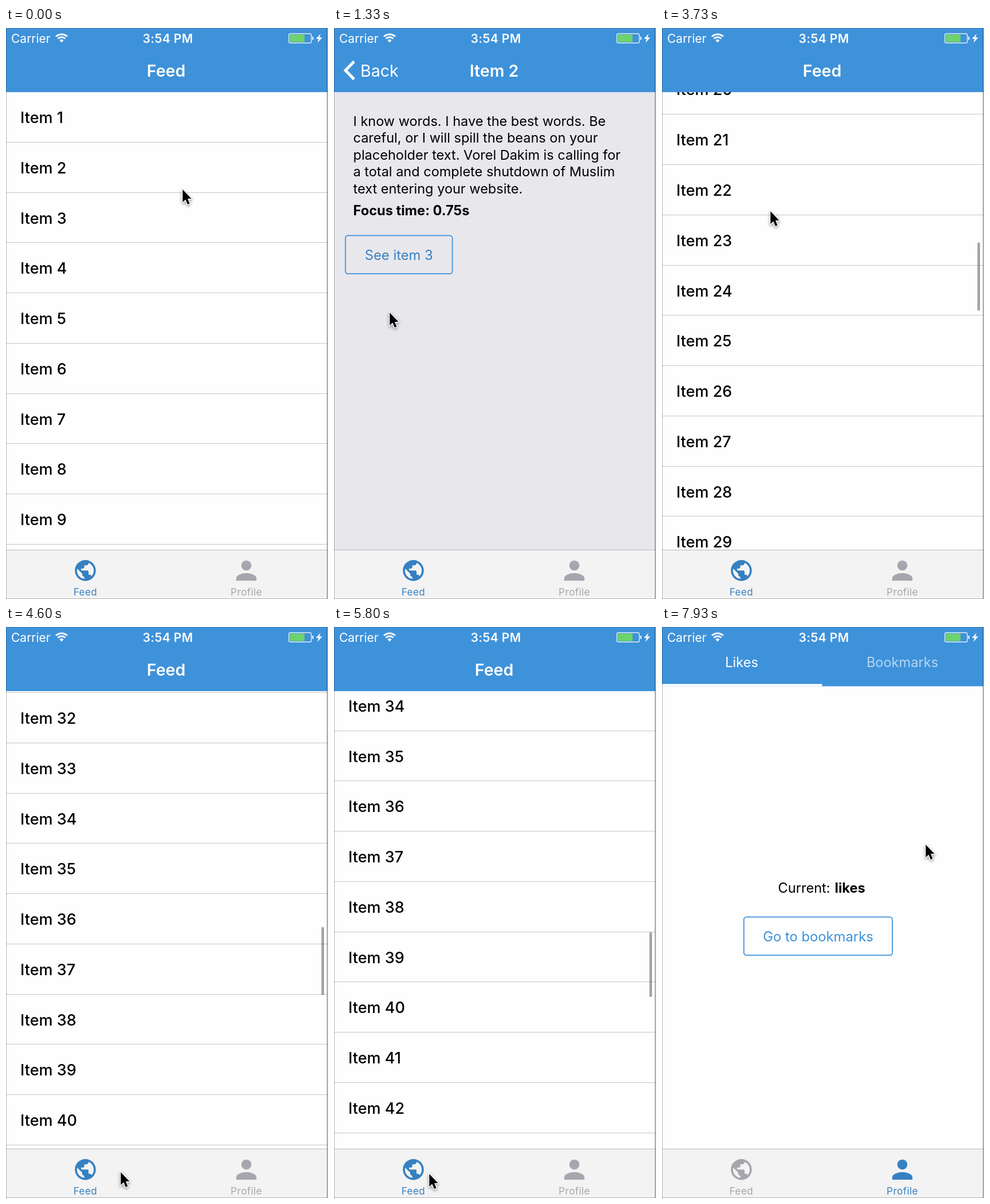
An HTML page with a canvas that plays this animation: 562 by 997 pixels, repeating every 8000 ms.

```html
<!DOCTYPE html>
<html lang="en">
<head>
<meta charset="utf-8">
<title>Feed navigation</title>
<style>
html, body { margin: 0; width: 100%; height: 100%; overflow: hidden; background: #fff; }
canvas { display: block; width: 562px; height: 997px; }
</style>
</head>
<body>
<canvas id="stage"></canvas>
<script>
const W = 562, H = 997, LOOP = 8000;
const TOP = 112, BOTTOM = 911, VIEW = BOTTOM - TOP, ROW = 87.78;
const BLUE = '#3e92da', LINK = '#3681c2', GREY = '#a5a6ae';

const PUSH = 400, FOCUS = 580, POP = 2502, SLIDE = 500;
const DRAG1 = 2850, FLING1 = 3040, DRAG2 = 3550, FLING2 = 3730;
const TO_TOP = 6000, AT_TOP = 6350, PROFILE = 7450, DECAY = 504;

const canvas = document.getElementById('stage');
const ratio = window.devicePixelRatio || 1;
canvas.width = W * ratio;
canvas.height = H * ratio;
const ctx = canvas.getContext('2d');

const clamp = v => Math.min(1, Math.max(0, v));
const smooth = u => u * u * (3 - 2 * u);
const span = (t, a, b) => clamp((t - a) / (b - a));

// Cubic bezier (0.2833, 0.99, 0.31833, 0.99), solved by bisection
function slideEase(u) {
  let lo = 0, hi = 1;
  for (let i = 0; i < 24; i++) {
    const s = (lo + hi) / 2, r = 1 - s;
    const x = 3 * r * r * s * 0.2833 + 3 * r * s * s * 0.31833 + s * s * s;
    if (x < u) lo = s; else hi = s;
  }
  const s = (lo + hi) / 2;
  return 2.97 * s * (1 - s) + s * s * s;
}

// time, x, y, 1 = constant speed
const pointer = [
  [0, 308, 280], [480, 308, 280], [1100, 97, 495], [1750, 97, 495],
  [2350, 66, 97], [2620, 66, 97], [2800, 185, 800], [DRAG1, 185, 800],
  [FLING1, 190, 320, 1], [3150, 190, 320], [3400, 185, 815], [DRAG2, 185, 815],
  [FLING2, 189, 318, 1], [3950, 189, 318], [4500, 200, 950], [4900, 200, 950],
  [5400, 166, 953], [7000, 166, 953], [7350, 422, 963], [7800, 422, 963],
  [7930, 460, 378, 1], [LOOP, 460, 378]
];

function pointerAt(t) {
  const i = pointer.findIndex(k => k[0] > t);
  const a = pointer[i - 1], b = pointer[i];
  let u = span(t, a[0], b[0]);
  if (!b[3]) u = smooth(u);
  return [a[1] + (b[1] - a[1]) * u, a[2] + (b[2] - a[2]) * u];
}

const coast = (t, start, reach) => reach * (1 - Math.exp(-(t - start) / DECAY));

function scrollAt(t) {
  if (t < DRAG1 || t >= AT_TOP) return 0;
  if (t < FLING1) return 480 * span(t, DRAG1, FLING1);
  if (t < DRAG2) return 480 + coast(t, FLING1, 1160);
  if (t < FLING2) return 1218 + 496 * span(t, DRAG2, FLING2);
  const rest = 1714 + coast(Math.min(t, TO_TOP), FLING2, 1221);
  return rest * (1 - smooth(span(t, TO_TOP, AT_TOP)));
}

function cardAt(t) {
  if (t < POP) return slideEase(span(t, PUSH, PUSH + SLIDE));
  return 1 - slideEase(span(t, POP, POP + SLIDE));
}

function rect(x, y, w, h, color) {
  ctx.fillStyle = color;
  ctx.fillRect(x, y, w, h);
}

function pill(x, y, w, h, r) {
  ctx.beginPath();
  ctx.roundRect(x, y, w, h, r);
}

function text(str, x, y, size, { weight = 400, color = '#000', align = 'left', gap = 0, alpha = 1 } = {}) {
  if (alpha <= 0) return;
  ctx.save();
  ctx.globalAlpha *= alpha;
  ctx.font = `${weight} ${size}px Inter, Roboto, sans-serif`;
  ctx.letterSpacing = gap + 'px';
  ctx.textAlign = align;
  ctx.fillStyle = color;
  ctx.fillText(str, x, y);
  ctx.restore();
}

function button(label, x, y, w, h, color) {
  ctx.strokeStyle = BLUE;
  ctx.lineWidth = 1.75;
  pill(x + 0.9, y + 0.9, w - 1.8, h - 1.8, 4.5);
  ctx.stroke();
  text(label, x + w / 2, y + 43, 23.8, { color, align: 'center' });
}

function drawList(scroll, p) {
  ctx.save();
  ctx.globalAlpha = 1 - 0.7 * p;
  const first = Math.max(0, Math.floor(scroll / ROW) - 1);
  for (let n = first; n < first + 12; n++) {
    const y = TOP + n * ROW - scroll;
    text('Item ' + (n + 1), 25 - 17.5 * p, Math.round(y + 54), 27, { weight: 500 });
    rect(0, Math.round(y + ROW) - 1, W, 1, '#c6c6c9');
  }
  ctx.restore();
}

function drawThumb(t, scroll) {
  const alpha = span(t, DRAG1, DRAG1 + 60) * (1 - span(t, 6400, 6600));
  if (!alpha) return;
  const content = t < 5200 ? 5365 : 5630;
  ctx.save();
  ctx.globalAlpha = alpha;
  ctx.fillStyle = 'rgba(0,0,0,.36)';
  pill(550.5, 119 + VIEW * scroll / content, 4.5, VIEW * VIEW / content, 2.2);
  ctx.fill();
  ctx.restore();
}

const story = [
  'I know words. I have the best words. Be',
  'careful, or I will spill the beans on your',
  'placeholder text. Vorel Dakim is calling for',
  'a total and complete shutdown of Muslim',
  'text entering your website.'
];

function drawCard(t, p) {
  if (p <= 0) return;
  ctx.save();
  ctx.translate(616 * (1 - p), 0);
  ctx.save();
  ctx.shadowColor = 'rgba(0,0,0,.5)';
  ctx.shadowBlur = 34 * ratio;
  rect(p < 1 ? -1 : 0, TOP, W + 1, VIEW - 8, '#e8e7ec');
  ctx.restore();
  rect(-1, TOP, W + 1, VIEW, '#e8e7ec');
  story.forEach((line, i) => text(line, 33.5, Math.round(171 + 29.4 * i), 23.5));
  const focus = Math.max(0, Math.min(t, POP) - FOCUS) / 1000;
  text(`Focus time: ${focus.toFixed(2)}s`, 33.5, 327, 23.6, { weight: 700 });
  button('See item 3', 19, 361.5, 188.5, 68.5, LINK);
  ctx.restore();
}

function drawFeed(t) {
  const p = cardAt(t), scroll = scrollAt(t);
  ctx.save();
  ctx.beginPath();
  ctx.rect(0, TOP, W, VIEW);
  ctx.clip();
  drawList(scroll, p);
  drawThumb(t, scroll);
  drawCard(t, p);
  ctx.restore();

  rect(0, 0, W, TOP, BLUE);
  const title = { weight: 600, color: '#fff', align: 'center' };
  text('Feed', 279.5 - 350 * p, 85, 28.5, { ...title, alpha: 1 - p });
  text('Item 2', 279.5 + 350 * (1 - p), 85, 28.5, { ...title, alpha: p });
  const back = clamp(2 * p - 1);
  if (back > 0) {
    ctx.save();
    ctx.globalAlpha = back;
    ctx.strokeStyle = '#fff';
    ctx.lineWidth = 5;
    ctx.beginPath();
    ctx.moveTo(35, 58.5);
    ctx.lineTo(20, 74);
    ctx.lineTo(35, 89.5);
    ctx.stroke();
    text('Back', 46, 85, 28.5, { color: '#fff' });
    ctx.restore();
  }
}

function drawProfile() {
  rect(0, 0, W, 103.5, BLUE);
  rect(0, 99.5, 279.5, 4, '#fff');
  text('Likes', 139, 70, 23.6, { color: '#fff', align: 'center' });
  text('Bookmarks', 419.5, 70, 23.6, { color: '#fff', align: 'center', alpha: 0.62 });
  text('Current:', 202.5, 464, 23.6);
  text('likes', 301.5, 464, 23.6, { weight: 700 });
  button('Go to bookmarks', 142, 505.5, 261, 68.5, BLUE);
}

function drawStatus() {
  text('Carrier', 9, 25.5, 21, { color: '#fff' });
  text('3:54 PM', 282.5, 25.5, 21, { weight: 600, color: '#fff', align: 'center', gap: 0.4 });

  ctx.strokeStyle = ctx.fillStyle = '#fff';
  ctx.lineWidth = 2.8;
  const a = Math.PI * 0.25;
  for (const r of [9, 14]) {
    ctx.beginPath();
    ctx.arc(97, 25, r, -Math.PI + a, -a);
    ctx.stroke();
  }
  ctx.beginPath();
  ctx.moveTo(97, 25.5);
  ctx.arc(97, 25, 5, -Math.PI + a, -a);
  ctx.fill();

  ctx.lineWidth = 1.2;
  pill(493.8, 9.8, 39, 16.4, 2.5);
  ctx.stroke();
  rect(495.5, 11.5, 25.5, 13, '#6fd36c');
  pill(534.5, 15, 2, 6, 1);
  ctx.fillStyle = '#fff';
  ctx.fill();
  ctx.fill(new Path2D('M549 10L541 19H545.5L543.5 26L552 16.5H547Z'));
}

const globe = new Path2D('M12 2C6.48 2 2 6.48 2 12s4.48 10 10 10 10-4.48 10-10S17.52 2 12 2zm-1 17.93c-3.95-.49-7-3.85-7-7.93 0-.62.08-1.21.21-1.79L9 15v1c0 1.1.9 2 2 2v1.93zm6.9-2.54c-.26-.81-1-1.39-1.9-1.39h-1v-3c0-.55-.45-1-1-1H8v-2h2c.55 0 1-.45 1-1V7h2c1.1 0 2-.9 2-2v-.41c2.93 1.19 5 4.06 5 7.41 0 2.08-.8 3.97-2.1 5.39z');
const person = new Path2D('M12 14C9.33 14 4 15.34 4 18V20H20V18C20 15.34 14.67 14 12 14Z');
person.moveTo(16, 8);
person.arc(12, 8, 4, 0, Math.PI * 2);

function tab(icon, label, x, y, scale, color) {
  ctx.save();
  ctx.translate(x - 12 * scale, y - 12 * scale);
  ctx.scale(scale, scale);
  ctx.fillStyle = color;
  ctx.fill(icon);
  ctx.restore();
  text(label, x, 991, 17, { color, align: 'center', gap: 0.45 });
}

function drawTabs(onProfile) {
  rect(0, BOTTOM, W, H - BOTTOM, '#f3f3f3');
  rect(0, BOTTOM, W, 1, '#b9b9b9');
  tab(globe, 'Feed', 138.5, 947.3, 1.83, onProfile ? GREY : LINK);
  tab(person, 'Profile', 419.5, 947.3, 2.2, onProfile ? LINK : GREY);
}

function drawEdges() {
  rect(0, 0, 1, H, 'rgba(0,0,0,.28)');
  rect(0, 0, W, 1, 'rgba(0,0,0,.18)');
  rect(0, H - 1, W, 1, 'rgba(0,0,0,.28)');
  rect(560, 0, 1, H, 'rgba(0,0,0,.5)');
  rect(561, 0, 1, H, '#d5d5d5');
}

const arrow = new Path2D('M0 1V25L5.6 19.8L9.6 29L13.6 27.3L9.7 18.3H17Z');

function drawPointer([x, y]) {
  ctx.save();
  ctx.translate(x + 0.3, y + 1);
  ctx.scale(0.9, 0.93);
  ctx.lineJoin = 'round';
  ctx.lineWidth = 3;
  ctx.strokeStyle = '#fff';
  ctx.shadowColor = 'rgba(0,0,0,.45)';
  ctx.shadowBlur = 5 * ratio;
  ctx.shadowOffsetY = 2 * ratio;
  ctx.stroke(arrow);
  ctx.shadowColor = 'transparent';
  ctx.fillStyle = '#000';
  ctx.fill(arrow);
  ctx.restore();
}

function draw(t) {
  ctx.setTransform(ratio, 0, 0, ratio, 0, 0);
  rect(0, 0, W, H, '#fefefe');
  const onProfile = t >= PROFILE;
  if (onProfile) drawProfile(); else drawFeed(t);
  drawStatus();
  drawTabs(onProfile);
  drawEdges();
  drawPointer(pointerAt(t));
}

const start = performance.now();
function tick() {
  draw((performance.now() - start) % LOOP);
  requestAnimationFrame(tick);
}
tick();
</script>
</body>
</html>
```
